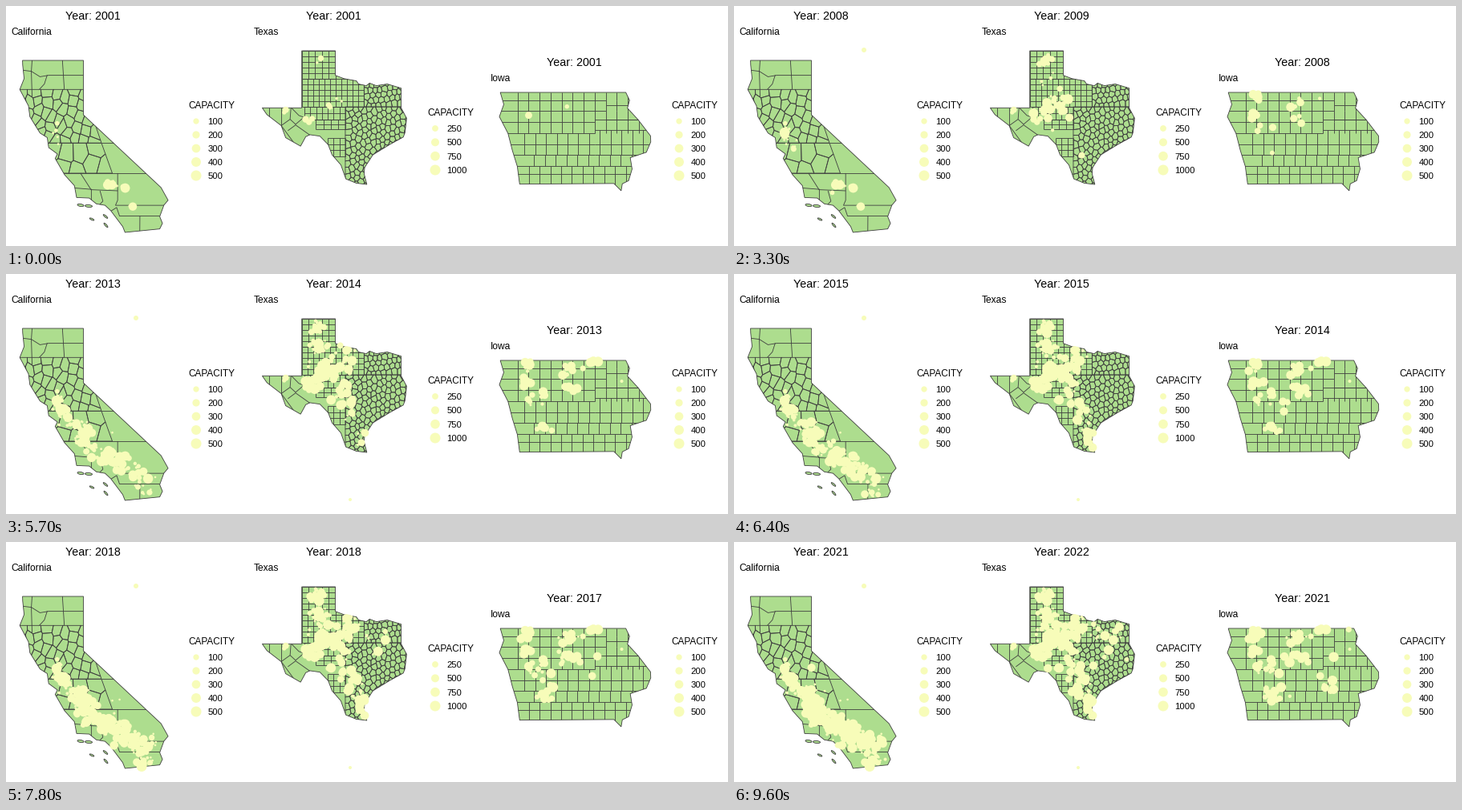
Animation, 900 px wide and 300 px high, one loop 9.7 s. Source, as a matplotlib script:

```python
import matplotlib.pyplot as plt
import numpy as np
from matplotlib.animation import FuncAnimation
from matplotlib.collections import LineCollection
from matplotlib.patches import Ellipse, Polygon
from matplotlib.path import Path

plt.rcParams["font.family"] = ["Liberation Sans", "DejaVu Sans"]
W, H, DPI, FRAMES = 900, 300, 100, 97
PX = 72 / DPI
LAND, DOT, INK = "#addd8e", "#f7fcb9", "#404040"
LINE = .85 * PX
rng = np.random.default_rng(7)

fig = plt.figure(figsize=(W / DPI, H / DPI), dpi=DPI, facecolor="white")
ax = fig.add_axes([0, 0, 1, 1])
ax.set_xlim(0, W)
ax.set_ylim(H, 0)
ax.axis("off")


def label(x, y, text, size, ha="left"):
    return ax.text(x, y, text, size=size * PX, ha=ha, va="baseline", color="black")


def diameter(share):
    """Dot width for a share of the largest capacity."""
    return 2.6 + 10.4 * np.sqrt(share)


def dots(xs, ys, widths):
    return ax.scatter(xs, ys, s=(np.asarray(widths) * PX) ** 2, c=DOT, linewidths=0, zorder=4)


def legend(x, y, step, count, first, last):
    label(x - 1.5, y, "CAPACITY", 11.8)
    values = step * np.arange(1, count + 1)
    ys = np.linspace(first, last, count)
    dots(np.full(count, x + 8), ys, diameter(values / values[-1]))
    for value, cy in zip(values, ys):
        label(x + 22.3, cy + 4, str(value), 11.3)


# --- county lines, in degrees ---
def cut(poly, p, q):
    """Part of poly nearer to p than to q."""
    n = q - p
    d = poly @ n - n @ (p + q) / 2
    out = []
    for a, b, da, db in zip(poly, np.roll(poly, -1, 0), d, np.roll(d, -1)):
        if da <= 0:
            out.append(a)
        if da * db < 0:
            out.append(a + (b - a) * da / (da - db))
    return np.array(out)


def cells(area, wide, tall, turn):
    """Irregular counties grown from a turned, jittered lattice."""
    area = np.array(area, float)
    k = np.arange(-20, 21)
    u, v = (m.ravel() for m in np.meshgrid(k, k))
    u = (u + v % 2 / 2) * wide + rng.normal(0, .16 * wide, u.size)
    v = v * tall + rng.normal(0, .16 * tall, v.size)
    c, s = np.cos(turn), np.sin(turn)
    seeds = np.c_[c * u - s * v, s * u + c * v] + area.mean(0)
    seeds = seeds[Path(area).contains_points(seeds)]
    out = []
    for p in seeds:
        poly = area
        for q in seeds:
            if 0 < np.hypot(*(q - p)) < 4 * max(wide, tall):
                poly = cut(poly, p, q)
        out.append(np.vstack([poly, poly[:1]]))
    return out


def box(x0, x1, y0, y1):
    return [(x0, y0), (x1, y0), (x1, y1), (x0, y1)]


def grid(x0, x1, nx, y0, y1, ny):
    return ([[(x, y0), (x, y1)] for x in np.linspace(x0, x1, nx + 1)]
            + [[(x0, y), (x1, y)] for y in np.linspace(y0, y1, ny + 1)])


def california_lines():
    north = [[(-123.55, 42), (-123.6, 41.4), (-123.55, 40)],
             [(-124.2, 41.46), (-123.6, 41.4), (-123, 41.1), (-122.4, 41.18), (-120, 41.18)],
             [(-121.45, 42), (-121.32, 40.4)],
             [(-122.5, 41.2), (-122.7, 40.7), (-123.05, 40.4)]]
    south = [[(-121.5, 35.79), (-115.6, 35.79)],
             [(-117.63, 35.79), (-117.63, 34.3), (-117.78, 34.02), (-114.4, 34.02)],
             [(-120.2, 35.79), (-119.47, 34.88), (-117.63, 34.82)],
             [(-120.7, 34.98), (-119.45, 34.9), (-119.45, 34.3)],
             [(-118.95, 34), (-118.65, 34.25), (-118.85, 34.82)],
             [(-118.1, 33.7), (-117.7, 33.9), (-117.5, 33.43), (-114.6, 33.43)],
             [(-116.09, 33.43), (-116.1, 32.5)],
             [(-118.75, 37.45), (-117.8, 37.45)]]
    upper = [(-124.4, 40.4), (-120, 40.4), (-118.75, 37.45), (-122.8, 37.45), (-124.4, 39)]
    lower = [(-122.6, 37.45), (-118.75, 37.45), (-118, 35.79), (-121.6, 35.79)]
    return north + south + cells(upper, .8, .43, .5) + cells(lower, 1.2, .68, .5)


def texas_lines():
    west = [[(-106, 32), (-106, 31.3)], [(-104.91, 32), (-104.91, 30.6)],
            [(-104.02, 32), (-104.1, 31.1), (-104.9, 30.6), (-103.8, 29.3)],
            [(-103.98, 32), (-103.3, 31.4), (-102.3, 31.08)],
            [(-104.1, 31.1), (-103.6, 30.7), (-102.8, 31.3)],
            [(-104.3, 30.2), (-103.6, 30.65), (-102.3, 29.85)]]
    return (west
            + grid(-103.04, -100, 5, 36.5, 34.31, 5)
            + grid(-103.04, -97.4, 11, 34.31, 32.08, 5)
            + grid(-102.8, -99.1, 7, 32.08, 31.08, 2)
            + grid(-101.75, -99.1, 4, 31.08, 30.29, 2)
            + grid(-100.7, -99.1, 3, 29.62, 28.2, 3)
            + cells(box(-99.1, -93.3, 25.6, 32.08), .5, .44, .45)
            + cells(box(-97.4, -93.9, 32.08, 34.1), .47, .42, .1))


def iowa_lines():
    tops = [43.5, 43.255, 42.91, 42.56, 42.21, 41.86, 41.51, 41.16, 40.9, 40.4]
    first = [-95.86] * 4 + [-95.57] * 2 + [-95.15] + [-95.38] * 2
    lines = []
    for top, low, x in zip(tops, tops[1:], first):
        step = .473 if top > 42.4 else .463
        for lon in x + step * np.arange(12):
            lift = .09 if lon > -92.6 and 42 < top < 42.4 else 0
            lines.append([(lon, top + lift), (lon, low)])
        # eastern rows sit off the western ones
        east = {43.255: -.17, 42.91: -.27, 42.56: .08, 42.21: .09}.get(low, 0)
        turn = -92.076 if low > 42.6 else -92.549
        lines += [[(-97, low), (turn, low)], [(turn, low + east), (-90, low + east)]]
    return lines


# --- outlines: a few key points ---
CA_EDGE = [
    (-124.21, 42), (-120, 42), (-120, 39), (-114.63, 35), (-114.14, 34.3),
    (-114.43, 34.03), (-114.72, 33.4), (-114.53, 33.03), (-114.72, 32.72),
    (-117.12, 32.53), (-117.28, 32.85), (-118.1, 33.72), (-118.5, 34.02),
    (-119.1, 34.1), (-119.6, 34.42), (-120.47, 34.45), (-120.62, 35.1),
    (-121.3, 35.7), (-121.95, 36.6), (-121.8, 36.85), (-122.4, 37.2),
    (-122.5, 37.75), (-123, 38), (-123.7, 38.9), (-123.8, 39.5),
    (-124.4, 40.4), (-124.1, 41), (-124.2, 41.75)]
TX_EDGE = [
    (-103.04, 36.5), (-100, 36.5), (-100, 34.56), (-99.2, 34.3), (-98.1, 34.13),
    (-97.9, 33.88), (-97.2, 33.75), (-96.9, 33.95), (-96.3, 33.75), (-95.3, 33.88),
    (-94.04, 33.55), (-94.04, 31.99), (-93.55, 31.18), (-93.7, 30.05), (-93.85, 29.7),
    (-95.1, 29.1), (-96.6, 28.3), (-97.35, 27.3), (-97.4, 26.8), (-97.15, 25.96),
    (-98.1, 26.06), (-99.05, 26.4), (-99.5, 27.5), (-100.3, 28.3), (-100.65, 29.1),
    (-101.4, 29.77), (-102.3, 29.88), (-102.68, 29.73), (-103.15, 28.98), (-104.5, 29.65),
    (-104.9, 30.6), (-106.2, 31.47), (-106.62, 32), (-103.04, 32)]
IA_EDGE = [
    (-96.6, 43.5), (-91.22, 43.5), (-91.06, 43.25), (-91.15, 43), (-90.7, 42.64),
    (-90.16, 42.12), (-90.15, 41.93), (-90.34, 41.6), (-91.03, 41.43), (-90.95, 41.07),
    (-91.1, 40.7), (-91.37, 40.6), (-91.42, 40.38), (-91.73, 40.61), (-95.77, 40.59),
    (-95.87, 41.15), (-96.08, 41.65), (-96.27, 42.2), (-96.64, 42.73), (-96.45, 43.12)]

# --- plant clusters: x, y, spread x, spread y, count, first year, last year ---
CA_GROUPS = [
    (65, 159, 3, 5, 26, -2, 14), (128, 222, 3, 3, 5, 0, 1), (144, 227, 4, 2, 3, 0, 1),
    (156, 250, 2, 1, 3, 0, 1), (72, 175, 4, 6, 28, 6, 19), (89, 189, 6, 6, 52, 9, 20),
    (98, 206, 6, 7, 95, 9, 22), (110, 220, 6, 5, 55, 11, 22), (128, 229, 7, 6, 70, 8, 21),
    (146, 241, 9, 7, 85, 10, 22), (167, 254, 10, 7, 55, 10, 22), (172, 274, 8, 4, 24, 11, 18),
    (120, 160, 30, 40, 14, 9, 21)]
TX_GROUPS = [
    (346, 132, 2, 2, 2, 0, 1), (379, 141, 5, 4, 12, -4, 12), (388, 66, 5, 6, 26, 0, 19),
    (388, 92, 8, 8, 24, 5, 20), (404, 121, 9, 6, 42, 0, 13), (402, 118, 16, 12, 40, 9, 22),
    (424, 152, 11, 9, 22, 7, 21), (442, 206, 5, 8, 26, 8, 22), (433, 184, 7, 10, 22, 11, 22),
    (430, 103, 7, 7, 12, 9, 20), (462, 120, 15, 12, 16, 16, 22)]
IA_GROUPS = [
    (650, 134, 2, 4, 8, 0, 9), (703, 118, 7, 6, 16, 0, 18), (703, 145, 8, 5, 14, 4, 19),
    (662, 156, 8, 5, 16, 5, 19), (649, 117, 4, 6, 14, 4, 20), (673, 189, 6, 6, 20, 7, 20),
    (733, 111, 5, 3, 7, 6, 11), (742, 181, 5, 4, 7, 18, 20), (752, 150, 12, 22, 7, 10, 20)]


def plants(groups, skew, shape):
    """Rows of x, y, width, opening year, roughly in order of opening."""
    rows = []
    for x, y, sx, sy, n, first, last in groups:
        pts = rng.normal((x, y), (sx, sy), (n, 2))
        widths = diameter(rng.random(n) ** skew)
        opened = np.ceil(np.linspace(first, last, n))
        rows.append(np.c_[pts, widths, opened])
    rows = np.vstack(rows)
    rows = rows[shape.get_path().contains_points(rows[:, :2], radius=1)]
    return rows[np.argsort(rows[:, 3] + rng.uniform(0, 4, len(rows)))]


class State:
    def __init__(self, name, proj, edge, lines, groups, skew, title, sub, span, year, outlier=None):
        lon, lat, x, y, kx, ky = proj

        def place(pts):
            pts = np.asarray(pts, float)
            return np.c_[x + (pts[:, 0] - lon) * kx, y + (lat - pts[:, 1]) * ky]

        shape = Polygon(place(edge), fc=LAND, ec=INK, lw=LINE, zorder=1)
        ax.add_patch(shape)
        borders = LineCollection([place(p) for p in lines], colors=INK, linewidths=LINE, zorder=2)
        ax.add_collection(borders)
        borders.set_clip_path(shape)
        self.rows = plants(groups, skew, shape)
        self.span, self.year, self.outlier = span, year, outlier
        self.title = label(*title, "", 14.3, "center")
        label(*sub, name, 12)
        self.art = dots([], [], [])

    def table(self, year):
        return self.rows[self.rows[:, 3] <= year, :3]

    def draw(self, i):
        years, steps = self.span
        t = 1 + years * i / steps
        # rows glide to the same row of next year's longer table
        rows, after = self.table(int(t)), self.table(int(t) + 1)
        rows = rows + t % 1 * (after[:len(rows)] - rows)
        if self.outlier and t >= self.outlier[3]:
            rows = np.vstack([rows, self.outlier[:3]])
        self.art.set_offsets(rows[:, :2])
        self.art.set_sizes((rows[:, 2] * PX) ** 2)
        start, rate = self.year
        self.title.set_text(f"Year: {round(start + rate * i)}")


states = [
    State("California", (-124.41, 42, 17, 68, 18.02, 22.7), CA_EDGE, california_lines(),
          CA_GROUPS, 4.5, (108.3, 17), (6.4, 36), (21, 99), (2001, 21 / 99), (162, 55, 6, 5)),
    State("Texas", (-106.65, 36.5, 319, 56, 13.77, 15.85), TX_EDGE, texas_lines(),
          TX_GROUPS, 3, (408.3, 17), (308.3, 36), (21, 96), (2001.43, .2143), (429, 282, 4, 11)),
    State("Iowa", (-96.64, 43.5, 615, 108, 29.08, 39.4), IA_EDGE, iowa_lines(),
          IA_GROUPS, 1.8, (708.3, 75), (604.3, 94), (20, 96), (2001, 20 / 96)),
]
for x, y, w, h, tilt in [(93, 249, 8, 3, 10), (103, 250, 9, 3, 5), (107, 266.5, 6, 2, 25),
                         (124, 263, 7, 2, 40), (124.5, 274, 7, 2, 48)]:
    ax.add_patch(Ellipse((x, y), w, h, angle=tilt, fc=LAND, ec=INK, lw=LINE))

legend(229, 128.5, 100, 5, 144, 212)
legend(527, 137, 250, 4, 153, 205)
legend(831, 128.5, 100, 5, 144, 212)


def update(i):
    for state in states:
        state.draw(i)
    return []


anim = FuncAnimation(fig, update, frames=FRAMES, interval=100, init_func=lambda: update(0),
                     repeat=True, repeat_delay=0, blit=False)
plt.show()
```
